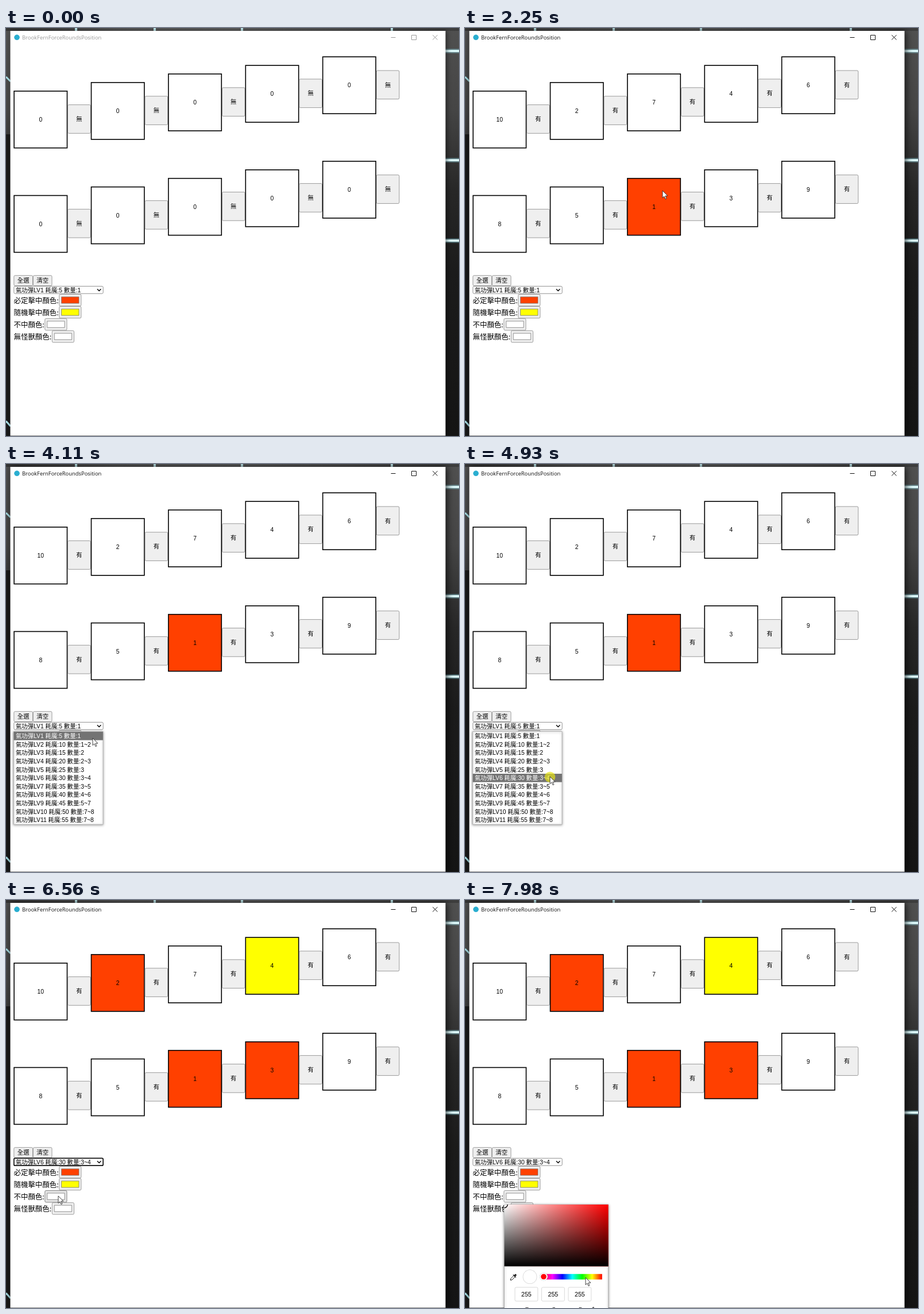
Animation of 789x710 px, one loop 8000 ms. Source, as an HTML page with a canvas:

```html
<!DOCTYPE html>
<html lang="zh-Hant">
<head>
<meta charset="utf-8">
<title>BrookFernForceRoundsPosition</title>
<style>
html, body { margin: 0; width: 100%; height: 100%; overflow: hidden; background: #222; }
canvas { display: block; width: 789px; height: 710px; }
</style>
</head>
<body>
<canvas id="stage" width="789" height="710"></canvas>
<script>
const ctx = document.getElementById('stage').getContext('2d');
const LOOP = 8000, STEP = 70;
const RED = '#ff4000', YELLOW = '#ffff00';
const UI = '"Liberation Sans", "Noto Sans CJK TC", "Noto Sans CJK", sans-serif';
const CJK = '"Noto Sans CJK TC", "Noto Sans CJK", sans-serif';
const SMALL = 10.36, LARGE = 12.43;

// moments of change, ms
const FOCUS = 2120, FILL = 2250, OPEN = 3830, PICK = 5060, PICKER = 7150;
const CLICKS = [[2120, 2250], [3700, 3830], [4930, 5060], [7020, 7150]];

const COUNTS = ['1', '1~2', '2', '2~3', '3', '3~4', '3~5', '4~6', '5~7', '7~8', '7~8'];
const skill = i => `氣功彈LV${i + 1} 耗魔:${5 * (i + 1)} 數量:${COUNTS[i]}`;
const ORDER = [[10, 2, 7, 4, 6], [8, 5, 1, 3, 9]];

// pointer path: time, x, y
const PATH = [
  [140, 730, 697], [770, 256, 418], [910, 256, 418], [1120, 240, 405], [1260, 185, 370],
  [1400, 128, 325], [1470, 163, 314], [1610, 290, 276], [1750, 337, 273], [2030, 337, 273],
  [2100, 344, 283], [2730, 344, 283], [2940, 310, 340], [3150, 210, 412], [3360, 136.5, 443],
  [3570, 148, 455], [3780, 148, 455], [4060, 151, 477], [4410, 148, 535], [4550, 148, 535],
  [4690, 148, 544], [5600, 148, 544], [5880, 110, 480], [6020, 62, 438], [6160, 32, 465],
  [6300, 50, 500], [6440, 82, 507], [6510, 91, 515], [7210, 91, 515], [7490, 140, 560],
  [7980, 210, 657]
];

function pointer(t) {
  const g = Math.floor((t + 10) / STEP) * STEP;
  if (g < PATH[0][0]) return null;
  const i = PATH.findIndex(p => p[0] > g);
  if (i < 0) return PATH[PATH.length - 1].slice(1);
  const [ta, xa, ya] = PATH[i - 1], [tb, xb, yb] = PATH[i];
  const k = (g - ta) / (tb - ta);
  return [xa + (xb - xa) * k, ya + (yb - ya) * k];
}

function fill(x, y, w, h, color) {
  ctx.fillStyle = color;
  ctx.fillRect(x, y, w, h);
}

function panel(x, y, w, h, color, edge, line = 0.8, r = 2) {
  ctx.beginPath();
  ctx.roundRect(x + line / 2, y + line / 2, w - line, h - line, r);
  ctx.fillStyle = color;
  ctx.fill();
  ctx.strokeStyle = edge;
  ctx.lineWidth = line;
  ctx.stroke();
}

function text(s, x, y, size, { font = UI, color = '#000', align = 'left' } = {}) {
  ctx.font = `${size}px ${font}`;
  ctx.textAlign = align;
  ctx.fillStyle = color;
  ctx.fillText(s, x, y + size * 0.36);
}

function poly(points, color, width, close) {
  ctx.beginPath();
  points.forEach(([x, y]) => ctx.lineTo(x, y));
  if (close) ctx.closePath();
  ctx.strokeStyle = color;
  ctx.lineWidth = width;
  ctx.stroke();
}

function disc(x, y, r, color) {
  ctx.beginPath();
  ctx.arc(x, y, r, 0, 7);
  ctx.fillStyle = color;
  ctx.fill();
}

function ramp(x0, y0, x1, y1, colors) {
  const g = ctx.createLinearGradient(x0, y0, x1, y1);
  colors.forEach((c, i) => g.addColorStop(i / (colors.length - 1), c));
  return g;
}

function desktop() {
  fill(0, 0, 789, 710, ramp(0, 0, 0, 710, ['#505050', '#454545', '#272727', '#1b1b1b', '#181818', '#141414']));
  fill(0, 0, 789, 5, ramp(0, 0, 789, 0, ['#343434', '#565656', '#5c5c5c', '#505050', '#3c3c3c']));
  fill(0, 185, 8, 525, '#191919');
  for (const x of [122, 259, 411, 672]) fill(x - 2, 0, 4, 5, '#c5eef2');
  for (const y of [40, 230, 370]) {
    fill(765, y - 4, 24, 8, 'rgba(120,180,190,.45)');
    fill(765, y - 2, 24, 4, '#daf6f8');
  }
  poly([[0, 85], [8, 93]], '#a8dfe6', 3);
  poly([[0, 684], [8, 693]], '#a8dfe6', 3);
}

function windowFrame(active) {
  ctx.save();
  ctx.shadowColor = active ? 'rgba(0,0,0,.75)' : 'rgba(0,0,0,.5)';
  ctx.shadowBlur = active ? 12 : 8;
  ctx.shadowOffsetX = 2;
  fill(7.5, 5, 758, 704.5, '#fff');
  ctx.restore();
  const ink = active ? '#111' : '#999';
  disc(19, 16.3, 4.8, '#2aaed0');
  text('BrookFernForceRoundsPosition', 28, 16.5, 9.42, { font: '"Open Sans", sans-serif', color: ink });
  poly([[670.5, 16.5], [678.5, 16.5]], ink, 1);
  poly([[706.5, 12.5], [714.5, 12.5], [714.5, 20.5], [706.5, 20.5]], ink, 1, true);
  poly([[743.2, 12.2], [751.5, 20.5]], ink, 1);
  poly([[751.5, 12.2], [743.2, 20.5]], ink, 1);
}

function button(x, y, w, h, label, hover) {
  const on = hover && hover[0] > x && hover[0] < x + w && hover[1] > y && hover[1] < y + h;
  panel(x, y, w, h, on ? '#e5e5e5' : '#efefef', on ? '#666' : '#858585');
  if (label) text(label, x + w / 2, y + h / 2, SMALL, { align: 'center' });
}

function cellColor(n, level) {
  const range = COUNTS[level].split('~').map(Number);
  if (n <= range[0]) return RED;
  return n <= range[range.length - 1] ? YELLOW : '#fff';
}

function grid(filled, level, hover) {
  ORDER.forEach((row, r) => row.forEach((n, i) => {
    const x = 13.3 + 134.4 * i, y = 109 - 14.9 * i + 181.7 * r;
    fill(x, y, 94, 100.5, '#000');
    fill(x + 1.6, y + 1.6, 90.8, 97.3, filled ? cellColor(n, level) : '#fff');
    text(filled ? n : 0, x + 47, y + 50.2, SMALL, { align: 'center' });
    button(x + 94, y + 24.2, 40.4, 50.5, filled ? '有' : '無', hover);
  }));
}

function colorRow(label, y, x, color, hover) {
  text(label, 13.6, y + 11.6, LARGE, { font: CJK });
  button(x, y, 39, 21.2, '', hover);
  panel(x + 3.9, y + 4.5, 31.2, 12, color, '#777', 0.8, 0);
}

function controls(level, focused, hover) {
  button(13.4, 430.3, 33.5, 18.6, '全選', hover);
  button(46.9, 430.3, 33.5, 18.6, '清空', hover);
  colorRow('必定擊中顏色:', 463, 92.3, RED, hover);
  colorRow('隨機擊中顏色:', 484.1, 92.3, YELLOW, hover);
  colorRow('不中顏色:', 505.2, 67.4, '#fff', hover);
  colorRow('無怪獸顏色:', 526.3, 79.9, '#fff', hover);
  if (focused) panel(13, 448.6, 157, 14.4, '#fff', '#101010', 1.7);
  else panel(13.4, 449, 156.2, 13.6, '#fff', '#767676');
  text(skill(level), 17, 455.8, SMALL);
  poly([[159, 454.2], [162.2, 457.4], [165.4, 454.2]], '#000', 1.4);
}

function shadowBox(x, y, w, h) {
  ctx.save();
  ctx.shadowColor = 'rgba(0,0,0,.4)';
  ctx.shadowBlur = 4;
  ctx.shadowOffsetY = 1;
  panel(x, y, w, h, '#fff', '#aaa', 0.8, 0);
  ctx.restore();
}

function menu(y) {
  const pitch = 14.6;
  const active = Math.max(0, Math.floor((y - 466) / pitch));
  shadowBox(13, 465, 156.4, 162.6);
  COUNTS.forEach((_, i) => {
    const top = 466 + pitch * i;
    if (i === active) fill(13.5, top, 155.4, pitch, '#737373');
    text(skill(i), 17, top + 7.4, SMALL, { color: i === active ? '#fff' : '#000' });
  });
}

function colorPicker() {
  shadowBox(68, 529.6, 182, 190);
  fill(68.4, 530, 181.2, 107.5, ramp(68.4, 0, 249.6, 0, ['#fff', '#f00']));
  fill(68.4, 530, 181.2, 107.5, ramp(0, 530, 0, 637.5, ['rgba(0,0,0,0)', '#000']));
  ctx.beginPath();
  ctx.arc(68.4, 530, 5.7, 0, Math.PI / 2);
  ctx.strokeStyle = '#111';
  ctx.lineWidth = 1.6;
  ctx.stroke();

  // eyedropper
  poly([[79, 661.5], [79.8, 658.8], [85, 653.5], [87.2, 655.7], [82, 661], [79, 661.5]], '#222', 1);
  poly([[83.8, 652], [88.6, 656.8]], '#222', 1.3);
  poly([[86.4, 654.2], [89, 651.6]], '#222', 3.2);

  disc(113, 655.7, 12.4, '#d5d5d5');
  disc(113, 655.7, 11.6, '#fff');
  fill(135, 650.8, 103.8, 9.6, ramp(135, 0, 238.8, 0, ['#f00', '#f0f', '#00f', '#0ff', '#0f0', '#ff0', '#f00']));
  disc(137, 655.5, 7, '#ccc');
  disc(137, 655.5, 6.4, '#fff');
  disc(137, 655.5, 4.8, '#f00');

  ['R', 'G', 'B'].forEach((name, i) => {
    const x = 86.6 + 46.5 * i;
    panel(x, 673.6, 40.6, 24.8, '#fff', '#d0d0d0');
    text('255', x + 20.3, 686.2, SMALL + 0.3, { align: 'center' });
    text(name, x + 21.5, 711.5, 9.4, { align: 'center' });
  });
  poly([[220.8, 711.5], [223.4, 708.6], [226, 711.5]], '#333', 1.1);
}

function arrow(x, y) {
  ctx.save();
  ctx.translate(x, y);
  ctx.beginPath();
  for (const [px, py] of [[0, 0], [0, 12.6], [2.9, 9.9], [5, 14.6], [6.9, 13.8], [4.9, 9.2], [8.9, 9.1]]) ctx.lineTo(px, py);
  ctx.closePath();
  ctx.fillStyle = '#fff';
  ctx.fill();
  ctx.strokeStyle = '#222';
  ctx.lineWidth = 0.85;
  ctx.stroke();
  ctx.restore();
}

function draw(t) {
  const at = pointer(t);
  const menuOpen = t >= OPEN && t < PICK;
  const level = t >= PICK ? 5 : 0;
  // the page reacts one step behind the pointer
  const hover = menuOpen || t < 130 ? null : pointer(t - STEP);

  desktop();
  windowFrame(t >= FOCUS);
  grid(t >= FILL, level, hover);
  controls(level, t >= PICK && t < 7020, hover);
  if (menuOpen) menu(at[1]);
  if (t >= PICKER) colorPicker();
  if (CLICKS.some(([a, b]) => t >= a && t < b)) disc(at[0], at[1] + 0.7, 9.3, 'rgba(232,228,20,.68)');
  if (at) arrow(...at);
}

const start = performance.now();
function tick() {
  draw((performance.now() - start) % LOOP);
  requestAnimationFrame(tick);
}
tick();
</script>
</body>
</html>
```
